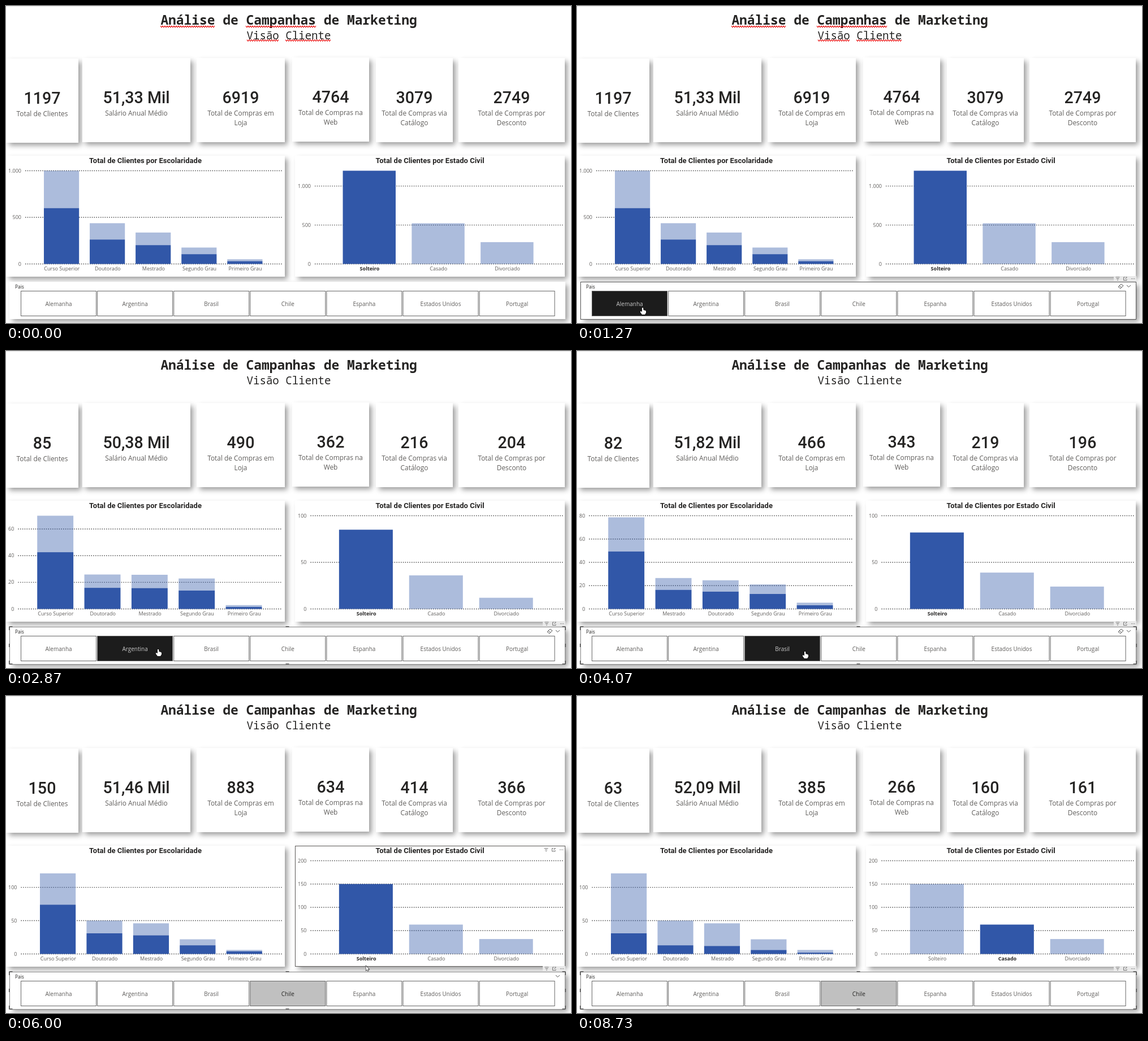
An HTML page with a canvas for the animation above (9.8 s loop, 999x561 px).

```html
<!DOCTYPE html>
<html lang="pt">
<head>
<meta charset="utf-8">
<title>Análise de Campanhas de Marketing</title>
<style>
html, body { margin: 0; width: 100%; height: 100%; overflow: hidden; background: #fff; }
canvas { display: block; }
</style>
</head>
<body>
<canvas id="stage" width="999" height="561"></canvas>
<script>
const c = document.getElementById('stage').getContext('2d');
const SANS = '"Open Sans", "Noto Sans", sans-serif';
const DIN = 'Roboto, sans-serif';
const MONO = '"Noto Sans Mono", "DejaVu Sans Mono", monospace';
const INK = '#252423', GREY = '#605e5c';
const BLUE = '#3157a8', PALE = 'rgba(49,87,168,.4)';
const BASE = 456.5, PLOT = 165;
const STEP = 1000 / 15, STEPS = 147, TWEEN = 5;
const CATALOGUE = 4;

const countries = ['Alemanha', 'Argentina', 'Brasil', 'Chile', 'Espanha', 'Estados Unidos', 'Portugal'];
const levels = ['Curso Superior', 'Doutorado', 'Mestrado', 'Segundo Grau', 'Primeiro Grau'];
const statuses = ['Solteiro', 'Casado', 'Divorciado'];

const cards = [
  { x: 0, right: 128, bottom: 242, lines: ['Total de Clientes'] },
  { x: 135, right: 326, bottom: 241, lines: ['Salário Anual Médio'] },
  { x: 337, right: 493, bottom: 241, lines: ['Total de Compras em', 'Loja'] },
  { x: 506, right: 642, bottom: 240, lines: ['Total de Compras na', 'Web'] },
  { x: 654, right: 790, bottom: 241, lines: ['Total de Compras via', 'Catálogo'] },
  { x: 800, right: 988, bottom: 241, lines: ['Total de Compras por', 'Desconto'] }
];

// one scene per click: steps of click and update, chosen country and status, clients per level and status
const scenes = [
  scene(0, 0, -1, 0, '1197|51,33 Mil|6919|4764|3079|2749', [1000, 437, 337, 176, 50], [1197, 522, 280], 1000, 1197),
  scene(20, 24, 0, 0, '76|51,92 Mil|468|338|212|189', [60, 23, 23, 20, 2], [76, 31, 21], 60, 100),
  scene(43, 43, 1, 0, '85|50,38 Mil|490|362|216|204', [70, 22, 21, 21, 5], [85, 36, 12], 70, 100),
  scene(61, 61, 2, 0, '82|51,82 Mil|466|343|219|196', [73, 27, 32, 9, 4], [82, 39, 24], 80, 100),
  scene(81, 82, 3, 0, '150|51,46 Mil|883|634|414|366', [121, 50, 46, 22, 6], [150, 63, 32], 140, 200),
  scene(97, 97, 3, 1, '63|52,09 Mil|385|266|160|161', [121, 50, 46, 22, 6], [150, 63, 32], 140, 200)
];

// The chosen status takes the same share of every school level.
function scene(click, update, country, status, values, byLevel, byStatus, levelMax, statusMax) {
  const share = byStatus[status] / byStatus.reduce((a, b) => a + b);
  const schooling = levels
    .map((name, i) => ({ name, all: byLevel[i], part: Math.round(byLevel[i] * share) }))
    .sort((a, b) => b.all - a.all);
  const marital = statuses.map((name, i) => ({
    name, all: byStatus[i], part: i === status ? byStatus[i] : 0, bold: i === status
  }));
  return {
    click, update, country, values: values.split('|'),
    schooling: { bars: schooling, max: levelMax },
    marital: { bars: marital, max: statusMax }
  };
}

const charts = [
  { key: 'schooling', x: 0, right: 493, labelX: 4, end: 488, title: 'Total de Clientes por Escolaridade', tween: true },
  { key: 'marital', x: 511, right: 988, labelX: 516, end: 984.5, title: 'Total de Clientes por Estado Civil' }
];

// pointer rests: arrival step, departure step, position
const rests = [
  [2, 2, 985, 400], [8, 8, 420, 420], [16, 31, 116, 534], [38, 49, 269, 528],
  [56, 69, 403, 532], [76, 86, 542, 527], [94, 126, 731, 428.5], [130, 130, 770, 540]
];

const mix = (a, b, p) => a + (b - a) * p;
const sceneIndex = (n, event) => scenes.findLastIndex(s => s[event] <= n);

function text(s, x, y, font, color = GREY, align = 'center') {
  c.font = font;
  c.fillStyle = color;
  c.textAlign = align;
  c.fillText(s, x, y);
}

function fill(x, y, w, h, color) {
  c.fillStyle = color;
  c.fillRect(x, y, w, h);
}

function line(points, color, width = 1) {
  c.beginPath();
  points.forEach(([x, y]) => c.lineTo(x, y));
  c.strokeStyle = color;
  c.lineWidth = width;
  c.stroke();
}

function box(x, y, w, h, color) {
  c.strokeStyle = color;
  c.lineWidth = 1;
  c.strokeRect(x, y, w, h);
}

function panel(x, y, right, bottom) {
  c.save();
  c.shadowColor = 'rgba(0,0,0,.4)';
  c.shadowBlur = 9;
  c.shadowOffsetX = c.shadowOffsetY = 4.5;
  fill(x, y, right - x, bottom - y, '#fff');
  c.restore();
}

function squiggle(x, right, y) {
  const points = [];
  for (let i = 0; x + i * 2 <= right; i++) points.push([x + i * 2, y + (i % 2 ? 1.3 : -1.3)]);
  line(points, '#e81010', 1.1);
}

function headerIcons(x, y) {
  const color = '#777';
  for (let i = 0; i < 3; i++) {
    const w = 3.5 - i * 1.25, ly = y - 2.5 + i * 2.5;
    line([[x - w, ly], [x + w, ly]], color);
    fill(x + 24 + i * 2.5, y - .5, 1.2, 1.2, color);
  }
  line([[x + 13, y - 2.5], [x + 10.5, y - 2.5], [x + 10.5, y + 3], [x + 16, y + 3], [x + 16, y + 1]], color);
  line([[x + 13, y + 1], [x + 16.5, y - 2.5], [x + 14, y - 2.5]], color);
}

function pointerAt(n) {
  const i = rests.findLastIndex(r => r[0] <= n);
  if (i < 0 || n > rests.at(-1)[1]) return null;
  const [, leave, x, y] = rests[i];
  if (n <= leave) return { x, y };
  const [arrive, , nx, ny] = rests[i + 1];
  const p = (n - leave) / (arrive - leave);
  return { x: mix(x, nx, p), y: mix(y, ny, p) };
}

function drawTitle(spellcheck) {
  fill(0, 0, 999, 1, '#e8e8e8');
  text('Análise de Campanhas de Marketing', 500, 33, 'bold 22.9px ' + MONO, INK);
  text('Visão Cliente', 500, 59, '19.1px ' + MONO, INK);
  if (!spellcheck) return;
  squiggle(273, 370, 36.5);
  squiggle(424, 548, 36.5);
  squiggle(426, 483, 61);
  squiggle(494, 575, 61);
}

function drawCards(n, loading) {
  cards.forEach(({ x, right, bottom, lines }, i) => {
    const { values } = scenes[sceneIndex(n, i === CATALOGUE ? 'click' : 'update')];
    const centre = (x + right) / 2, top = bottom - 149;
    panel(x, top, right, bottom);
    text(values[i], centre, bottom - 69, '500 28.6px ' + DIN, INK);
    lines.forEach((s, j) => text(s, centre, bottom - 46.7 + j * 17, '11.9px ' + SANS));
    if (loading) fill(x + 4, top + 7, 1, 1, '#999');
  });
}

// Smallest 1, 2 or 5 times a power of ten that splits the axis into at most four.
function tickFor(max) {
  const power = 10 ** Math.floor(Math.log10(max / 4));
  return [1, 2, 5, 10].map(k => k * power).find(t => max / t <= 4);
}

function drawChart({ key, x, right, labelX, end, title, tween }, n, loading, hovered) {
  const i = sceneIndex(n, 'update');
  const { bars, max } = scenes[i][key], from = scenes[Math.max(0, i - 1)][key];
  const p = tween ? Math.min(1, (n - scenes[i].update + 1) / TWEEN) : 1;
  const height = (j, kind) => PLOT * mix(from.bars[j][kind] / from.max, bars[j][kind] / max, p);
  const tick = tickFor(max), top = Math.floor(max / tick) * tick;
  const font = '9px ' + SANS;
  const label = v => v < 1000 ? String(v) : v / 1000 + '.000';

  c.font = font;
  const labelEnd = labelX + c.measureText(label(top)).width, start = labelEnd + 7;
  const pitch = (end - start) / (bars.length + .6), w = pitch * .767;

  panel(x, 265, right, 479);
  text(title, (x + right) / 2, 278, 'bold 13px ' + DIN, INK);
  for (let v = 0; v <= top; v += tick) {
    const y = BASE - v / max * PLOT;
    c.setLineDash([1.5, 2.3]);
    line([[start, y], [end, y]], '#4a4a4a', 1.4);
    c.setLineDash([]);
    text(label(v), labelEnd, y + 3, font, GREY, 'right');
  }
  bars.forEach(({ name, bold }, j) => {
    const bx = start + pitch * (j + .407), all = height(j, 'all'), part = height(j, 'part');
    fill(bx, BASE - all, w, all - part, PALE);
    fill(bx, BASE - part, w, part, BLUE);
    text(name, bx + w / 2 + .7, 468, (bold ? 'bold ' : '') + font, bold ? INK : GREY);
  });
  if (loading) fill(x + 4, 272, 1, 1, '#999');
  if (hovered) {
    box(x + .5, 265.5, right - x, 213, GREY);
    headerIcons(right - 33, 272);
  }
}

function drawHandles() {
  for (const side of [-1, 0, 1]) {
    const x = 497.5 + side * 491.5, y = 521 + side * 33;
    for (const other of [-1, 0, 1]) {
      if (side) fill(x - 1, 521 + other * 30 - 3, 2, 6, '#666');
      if (side) fill(497.5 + other * 489 - 3, y - 1, 6, 2, '#666');
    }
  }
}

function drawSlicer(selected, pointer, hovered) {
  const active = selected >= 0;
  panel(6, 488, 989, 554);
  if (hovered || active) {
    fill(949, 478, 40, 9, '#e9e9e9');
    headerIcons(956, 482.5);
    box(6.5, 488.5, 982, 66, active ? '#888' : '#555');
  }
  if (active) drawHandles();
  if (hovered) {
    line([[957, 497], [962, 492], [966, 495], [961, 500], [957, 497]], '#555');
    line([[959, 495], [963, 498.5]], '#555');
  }
  if (pointer && (hovered || active)) line([[972, 494], [975.5, 497.5], [979, 494]], '#555');
  text('Pais', 16, 500, '8.4px ' + SANS, INK, 'left');
  countries.forEach((name, i) => {
    const x = 26.5 + i * 135.1;
    const over = hovered && pointer.x > x && pointer.x < x + 133 && pointer.y > 504;
    const [back, ink] = over ? ['#1c1c1c', '#c8c8c8'] : i === selected ? ['#c0c0c0', INK] : ['#fff', GREY];
    fill(x, 504.5, 133, 44, back);
    box(x, 504.5, 133, 44, '#666');
    text(name, x + 66.5, 530.5, '10px ' + SANS, ink);
  });
}

const hand = [[-1, 0], [1, 0], [1.5, 4], [5, 5], [6, 6], [6, 9], [4, 12], [-1, 12], [-4, 8], [-4, 6], [-1, 7]];
const arrow = [[0, 0], [0, 8], [2, 6.3], [3.2, 9], [4.4, 8.5], [3.2, 5.8], [5.5, 5.8]];

function drawPointer({ x, y }, shape) {
  c.beginPath();
  shape.forEach(([dx, dy]) => c.lineTo(x + dx, y + dy));
  c.closePath();
  c.lineWidth = 1.2;
  c.strokeStyle = '#111';
  c.stroke();
  c.fillStyle = '#fff';
  c.fill();
}

function draw(n) {
  const pointer = pointerAt(n);
  const inside = (x, top, right, bottom) =>
    !!pointer && pointer.x >= x && pointer.x <= right && pointer.y >= top && pointer.y <= bottom;
  const current = scenes[sceneIndex(n, 'click')];
  const loading = n < current.update;
  fill(0, 0, 999, 561, '#fff');
  drawTitle(current.country < 0);
  drawCards(n, loading);
  for (const chart of charts) drawChart(chart, n, loading, inside(chart.x, 265, chart.right, 479));
  drawSlicer(current.country, pointer, inside(6, 488, 989, 554));
  if (pointer) drawPointer(pointer, inside(26, 504, 971, 549) ? hand : arrow);
}

const began = performance.now();
function frame() {
  const t = (performance.now() - began) % 9800;
  draw(Math.min(STEPS - 1, Math.floor((t + 4) / STEP)));
  requestAnimationFrame(frame);
}
frame();
</script>
</body>
</html>
```
